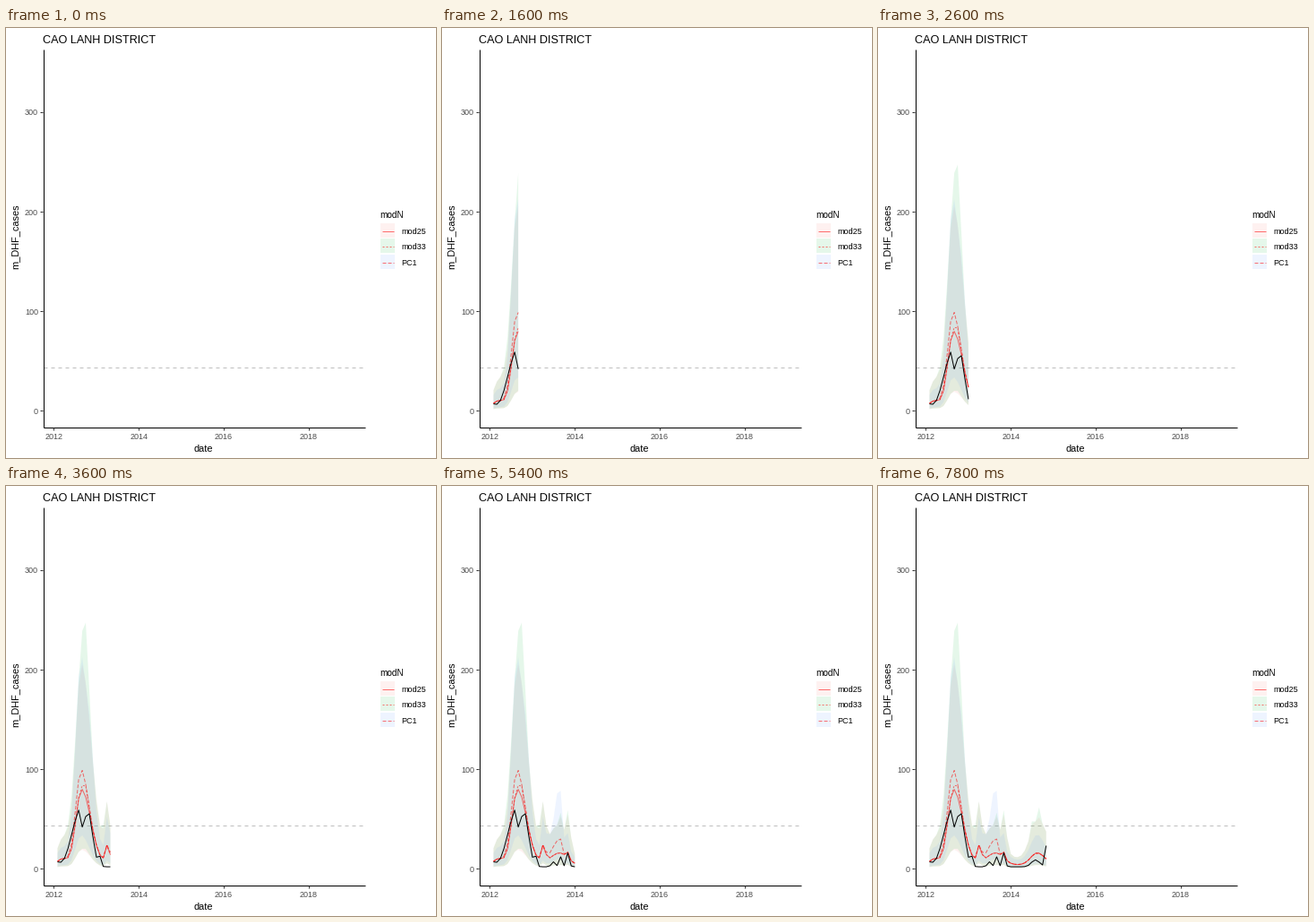
Write a matplotlib script that moves like this. It is 480 px wide and 480 px high and loops after 8000 ms.

```python
import numpy as np
import matplotlib.pyplot as plt
from matplotlib.animation import FuncAnimation

plt.rcParams["font.family"] = "Liberation Sans"

SIZE, DPI = 480, 72
FRAMES, STEP = 40, 200
LEFT, RIGHT, TOP, BOTTOM = 41.5, 400.5, 24, 445.5
RED, GREEN, BLUE = "#F8766D", "#00BA38", "#619CFF"
DOTS, DASHES = (0, (2, 2)), (0, (4, 2))
GREY = "#4D4D4D"


def date_x(day):
    return 57.5 + 0.1297 * np.asarray(day, float)


def case_y(value):
    return 427.3 - 1.1117 * np.asarray(value, float)


def days_since_start(dates):
    return (dates.astype("datetime64[D]") - np.datetime64("2012-02-01")).astype(int)


# Monthly steps, February 2012 to November 2014
days = days_since_start(np.arange("2012-02", "2014-12", dtype="datetime64[M]"))
keys = np.round(days / 2526 * 99)
month = np.arange(len(days))


def waves(*bumps):
    """Sum of bells, each (centre, height, left width[, right width])."""
    total = np.zeros(len(month))
    for centre, height, left, *right in bumps:
        width = np.where(month < centre, left, right[0] if right else left)
        total += height * np.exp(-((month - centre) / width) ** 2)
    return total


observed = 2 + waves((0, 4, 1), (6, 50, 3, 0.9), (8.6, 56, 1.8), (12, 9, 0.5),
                     (17, 5, 0.8), (19, 10, 0.5), (21, 14, 0.6), (30, 7, 1.6),
                     (33, 21, 0.5))
mod25 = 4 + waves((1.5, 6, 2), (6.8, 76, 2.2, 3.6), (14, 16, 0.7, 1),
                  (18.7, 12, 3.5, 3), (21, 6, 0.6), (30.5, 12, 2.6, 3))
mod33 = mod25 + waves((8, 11, 1))
pc1 = mod25 + waves((6.5, 20, 2.2), (19, 14, 3, 0.5))

high33 = 10 + waves((1.3, 17, 1.8), (7.5, 222, 3.1, 1.9), (10, 60, 2.4),
                    (14, 45, 1), (18, 33, 3.5), (19, 16, 0.6), (21, 33, 0.7, 1),
                    (29, 10, 0.6), (30.7, 38, 3, 4), (31, 14, 0.6))
high25 = np.minimum(high33, 2.4 * mod25 + 14)
high_pc = 2.15 * pc1 + waves((9.5, 30, 1, 1.2), (18.6, 22, 1, 0.6))

fig = plt.figure(figsize=(SIZE / DPI, SIZE / DPI), dpi=DPI, facecolor="white")
ax = fig.add_axes([0, 0, 1, 1])
ax.set_xlim(0, SIZE)
ax.set_ylim(SIZE, 0)
ax.axis("off")


def segment(x, y, color="black", style="-", **kw):
    return ax.plot(x, y, color=color, lw=1, ls=style, solid_capstyle="butt",
                   dash_capstyle="butt", **kw)[0]


def label(x, y, text, size, color="black", ha="left", **kw):
    ax.text(x, y, text, fontsize=size, color=color, ha=ha,
            va=kw.pop("va", "baseline"), **kw)


# Axes and titles
segment([LEFT, RIGHT], [BOTTOM, BOTTOM])
segment([LEFT, LEFT], [TOP, BOTTOM + 0.5])
for v in (0, 100, 200, 300):
    y = float(case_y(v))
    segment([38, 41], [y, y], "#333333")
    label(36, y + 3.7, str(v), 9, GREY, "right")
for year in (2012, 2014, 2016, 2018):
    x = float(date_x(days_since_start(np.datetime64(f"{year}-01-01"))))
    segment([x, x], [446, 449], "#333333")
    label(x, 459, str(year), 9, GREY, "center")
label(41, 17, "CAO LANH DISTRICT", 12.6)
label(220.5, 473, "date", 11, ha="center")
label(10.5, 233, "m_DHF_cases", 11, ha="center", va="center", rotation=90)
segment([LEFT, RIGHT], [378.5, 378.5], "#BEBEBE", (0, (4, 4)), zorder=1)

# Legend
label(417.5, 212, "modN", 10)
entries = [("mod25", RED, "-"), ("mod33", GREEN, DOTS), ("PC1", BLUE, DASHES)]
for i, (name, fill, style) in enumerate(entries):
    y = 218 + 17.28 * i
    ax.add_patch(plt.Rectangle((418, y), 16, 16.2, fc=fill, alpha=0.1, lw=0))
    mid = np.floor(y + 8.6) + 0.5
    segment([420, 433], [mid, mid], "red", style, alpha=0.55)
    label(441, mid + 3.7, name, 9)

# Moving parts
bands = []
for low, high, fill in [(0.24 * mod25, high25, RED),
                        (0.24 * mod33, high33, GREEN),
                        (0.34 * pc1, high_pc, BLUE)]:
    patch = ax.fill([0, 0, 0], [0, 0, 0], fc=fill, alpha=0.1, lw=0, zorder=1.5)[0]
    bands.append((patch, low, high))

curves = [(segment([], [], "red", style, alpha=0.55, zorder=3), data)
          for style, data in [("-", mod25), (DOTS, mod33), (DASHES, pc1)]]
curves.append((segment([], [], zorder=4), observed))


def reveal(data, k):
    """Points passed by step k, plus the interpolated tip."""
    return np.append(data[keys < k], np.interp(k, keys, data))


def update(k):
    x = date_x(reveal(days, k))
    for patch, low, high in bands:
        lo, hi = case_y(reveal(low, k)), case_y(reveal(high, k))
        patch.set_xy(np.column_stack([np.append(x, x[::-1]),
                                      np.append(hi, lo[::-1])]))
        patch.set_visible(k > 0)
    for line, data in curves:
        line.set_data(x, case_y(reveal(data, k)))
        line.set_visible(k > 0)
    return [b[0] for b in bands] + [c[0] for c in curves]


anim = FuncAnimation(fig, update, frames=FRAMES, interval=STEP,
                     init_func=lambda: update(0), repeat=True, repeat_delay=0)
plt.show()
```
